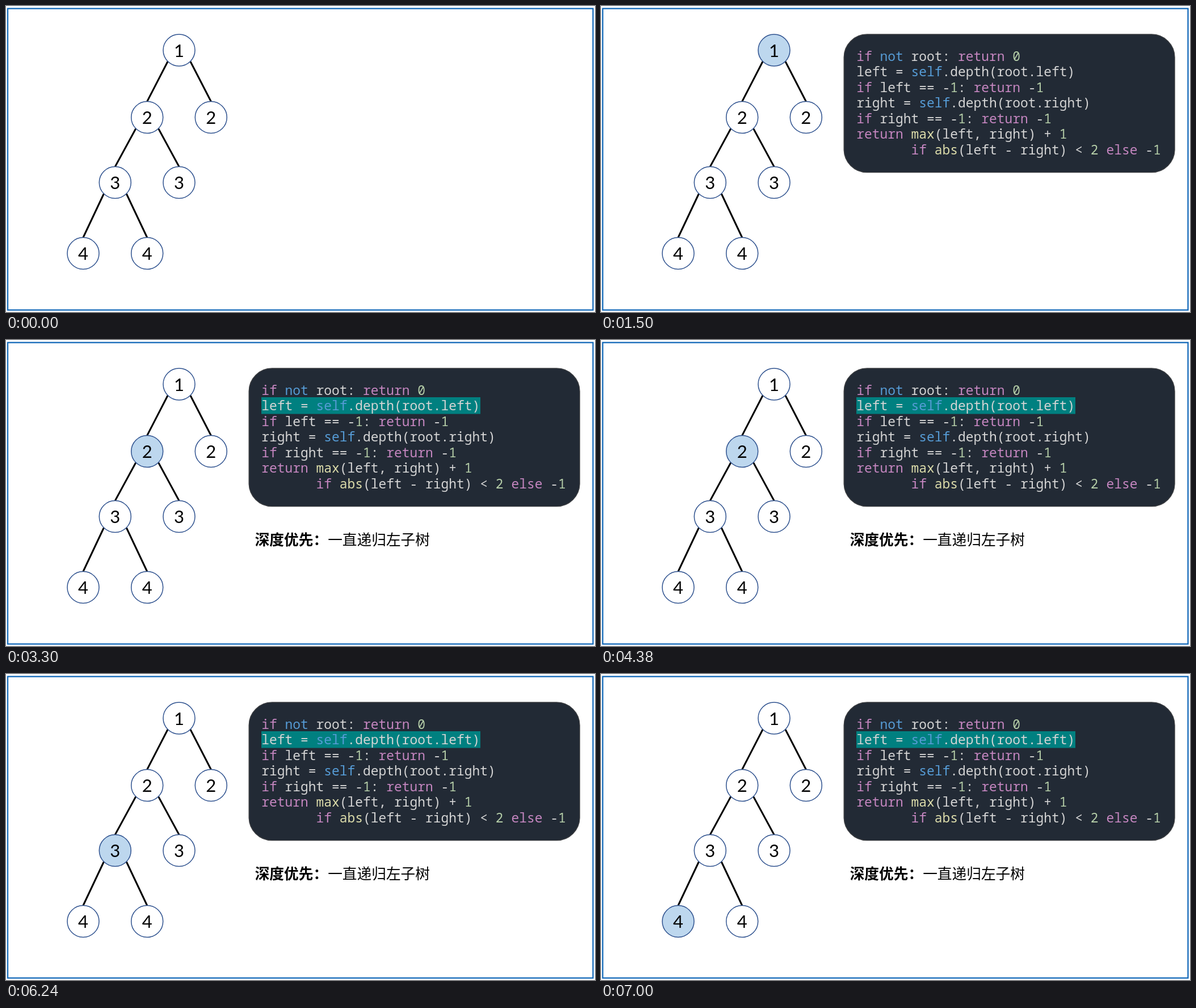
Recreate the animation shown at these times as an HTML page. Size 1038 by 540 pixels, loop 8000 ms.

```html
<!DOCTYPE html>
<html lang="zh-CN">
<head>
<meta charset="utf-8">
<title>Tree depth</title>
<style>
  html, body { margin: 0; width: 100%; height: 100%; overflow: hidden; background: #fff; }
  svg { display: block; width: 100vw; height: 100vh; }
  .edge { stroke: #000; stroke-width: 3; }
  .node { stroke: #2f528f; stroke-width: 1.5; }
  .label { font: 31px Lato, sans-serif; text-anchor: middle; }
  .code { font: 22.93px "Noto Sans Mono", monospace; white-space: pre; font-variant-ligatures: none; fill: #d4d4d4; }
  .key { fill: #c586c0; }
  .word { fill: #569cd6; }
  .call { fill: #dcdcaa; }
  .num { fill: #b5cea8; }
  .note { font: 350 25.7px "Noto Sans CJK SC", "Noto Sans CJK", sans-serif; }
  .bold { font-weight: 700; }
</style>
</head>
<body>
<svg id="stage" viewBox="0 0 1038 540">
  <rect width="1038" height="540" fill="#fff"/>
  <rect x="3" y="4.5" width="1031.5" height="532" fill="none" stroke="#1268b8" stroke-width="2.3"/>
  <g id="tree"></g>
  <g id="panel">
    <rect x="428.2" y="50" width="582.8" height="243.6" rx="40.6" fill="#222a35" stroke="#3b3d40" stroke-width="1.4"/>
    <rect id="mark" x="450" y="101" width="386" height="29.5" fill="#008080"/>
  </g>
  <g id="note" class="note">
    <text x="438.7" y="362.3" class="bold">深度优先：</text>
    <text x="567.2" y="362.3">一直递归左子树</text>
  </g>
</svg>
<script>
const LOOP = 8000;
const $ = id => document.getElementById(id);

function add(parent, tag, attrs, text) {
  const el = document.createElementNS("http://www.w3.org/2000/svg", tag);
  for (const key in attrs) el.setAttribute(key, attrs[key]);
  if (text !== undefined) el.textContent = text;
  return parent.appendChild(el);
}

// value, x, y, parent index
const nodes = [
  [1, 305, 78], [2, 248.7, 196.5, 0], [2, 361.3, 196.5, 0],
  [3, 192.3, 311.5, 1], [3, 305, 311.5, 1],
  [4, 136, 436.5, 3], [4, 248.7, 436.5, 3]
];

for (const [, x, y, up] of nodes) {
  if (up === undefined) continue;
  const [, px, py] = nodes[up];
  add($("tree"), "line", { class: "edge", x1: px + Math.sign(x - px) * 20, y1: py + 20, x2: x, y2: y - 28 });
}
const circles = nodes.map(([value, x, y]) => {
  const circle = add($("tree"), "circle", { class: "node", cx: x, cy: y, r: 28 });
  add($("tree"), "text", { class: "label", x, y: y + 11.8 }, value);
  return circle;
});

const code = [
  "if not root: return 0",
  "left = self.depth(root.left)",
  "if left == -1: return -1",
  "right = self.depth(root.right)",
  "if right == -1: return -1",
  "return max(left, right) + 1",
  "       if abs(left - right) < 2 else -1"
];
const styles = [
  [/^(if|return|else)$/, "key"],
  [/^(not|self)$/, "word"],
  [/^(max|abs)$/, "call"],
  [/^\d+$/, "num"]
];
code.forEach((line, i) => {
  const row = add($("panel"), "text", { class: "code", x: 450.2, y: 96.5 + i * 27.55 });
  for (const token of line.match(/\w+|\W+/g)) {
    const style = styles.find(([pattern]) => pattern.test(token));
    add(row, "tspan", style ? { class: style[1] } : {}, token);
  }
});

// start time, visited node
const visits = [[1500, 0], [3300, 1], [5100, 3], [7000, 5]];

function show(el, on) {
  el.setAttribute("visibility", on ? "visible" : "hidden");
}

function draw(now) {
  const t = now % LOOP;
  const visit = visits.filter(([start]) => t >= start).pop();
  circles.forEach((circle, i) => {
    circle.setAttribute("fill", visit && visit[1] === i ? "#bdd7ee" : "#fff");
  });
  show($("panel"), t >= 1500);
  show($("mark"), t >= 3300);
  show($("note"), t >= 3300);
}

const origin = performance.now();
function tick() {
  draw(performance.now() - origin);
  requestAnimationFrame(tick);
}
tick();
</script>
</body>
</html>
```
